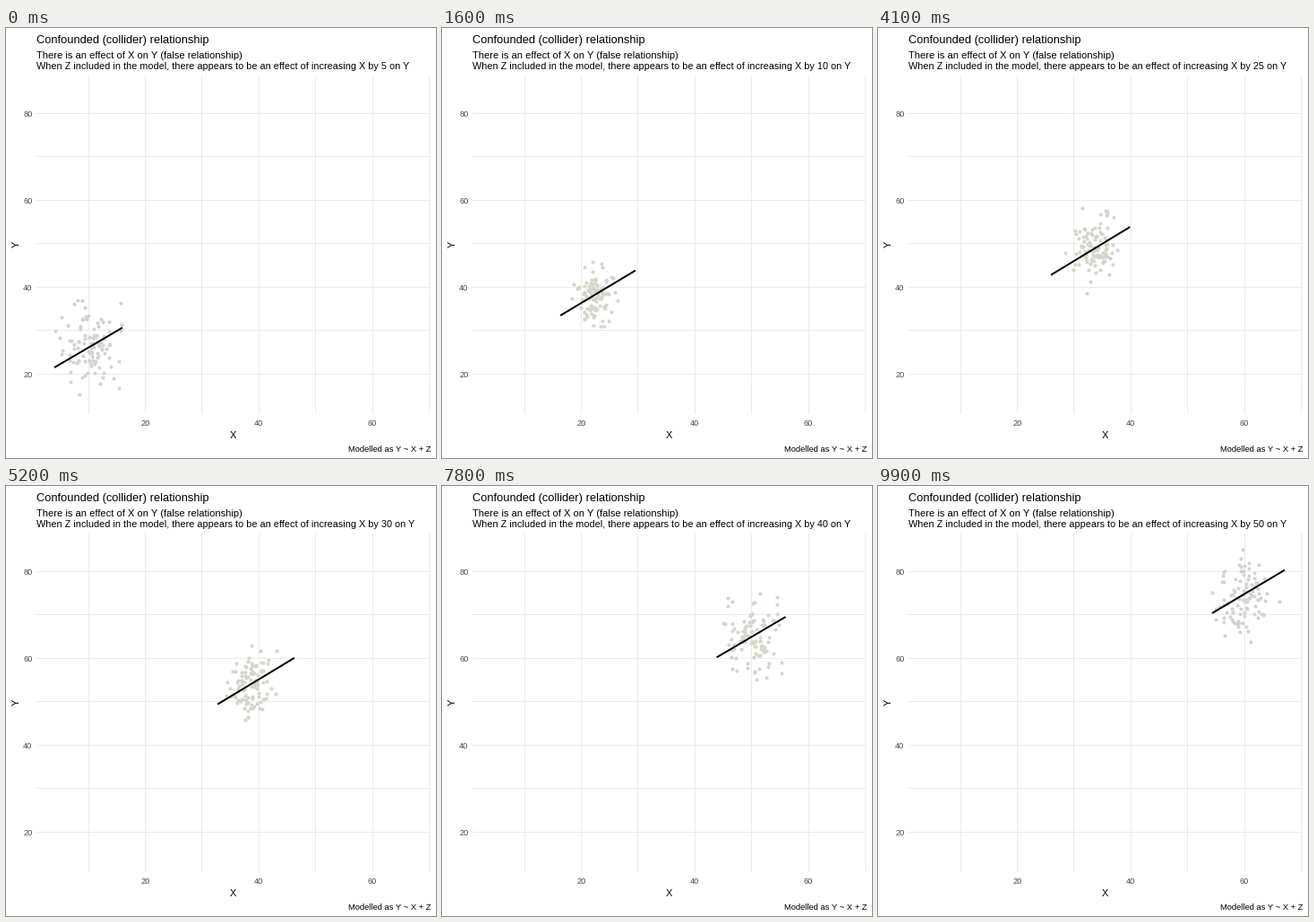
A matplotlib script for the animation above (10 s loop, 480x480 px).

```python
import numpy as np
import matplotlib.pyplot as plt
from matplotlib.animation import FuncAnimation

SIZE, DPI = 480, 96
PT = 72 / DPI            # points per pixel
STEPS = 11               # animation steps between two states
N_STATES, N_DOTS = 10, 100
LAST = STEPS * (N_STATES - 1)
SLOPE = -0.743           # drift of cloud and line, in pixels

plt.rcParams["font.family"] = "Liberation Sans"


def px(x):
    return 92 + 6.34 * (x - 10)


def py(y):
    return 386 - 4.85 * (y - 20)


# Range of X in each state, in pixels; the fitted line spans it.
left = np.array([54, 118, 149, 169, 202, 249, 269, 304, 333, 373])
right = np.array([130, 200, 235, 258, 290, 334, 351, 380, 420, 454])


def make_states():
    """X rises by 5 per state, by 10 in the first one; Y follows it."""
    rng = np.random.default_rng(12)
    noise = rng.uniform(-1, 1, (N_STATES, N_DOTS, 2, 3)).sum(axis=3)
    k = np.arange(N_STATES)
    cx = 93 + 31.4 * np.where(k > 0, k + 1, 0)
    cy = 357 + SLOPE * (cx - 92)
    xs = cx[:, None] + 15 * noise[..., 0]
    ys = cy[:, None] + 21 * noise[..., 1]
    xs = np.clip(xs, left[:, None], right[:, None])
    return np.stack([xs, ys], axis=2)


def blend(values, step):
    k, part = divmod(step, STEPS)
    f = part / STEPS
    return (1 - f) * values[k] + f * values[min(k + 1, N_STATES - 1)]


states = make_states()

fig = plt.figure(figsize=(SIZE / DPI, SIZE / DPI), dpi=DPI, facecolor="white")
ax = fig.add_axes([0, 0, 1, 1])
ax.set_xlim(0, SIZE)
ax.set_ylim(SIZE, 0)
ax.axis("off")


def label(x, y, s, size, color="black", **kw):
    kw.setdefault("va", "baseline")
    return ax.text(x, y, s, fontsize=size * PT, color=color, **kw)


grid = dict(color="#ebebeb", lw=PT, snap=False, solid_capstyle="butt", zorder=1)
for v in range(10, 71, 10):
    ax.plot([np.floor(px(v)) + 0.5] * 2, [53, 431], **grid)
for v in range(20, 81, 10):
    ax.plot([34, 474], [np.floor(py(v)) + 0.5] * 2, **grid)

for v in (20, 40, 60):
    label(px(v), 444, v, 9.3, "#4d4d4d", ha="center")
for v in (20, 40, 60, 80):
    label(29.5, py(v) + 4.3, v, 9.3, "#4d4d4d", ha="right")

label(34, 17, "Confounded (collider) relationship", 12.9)
label(34, 34, "There is an effect of X on Y (false relationship)", 11.1)
effect = label(34, 46, "", 10.85)
label(253.5, 458, "X", 11, ha="center")
label(11.5, 241, "Y", 11, ha="center", va="center", rotation=90)
label(474.5, 473, "Modelled as Y ~ X + Z", 9.4, ha="right")

dots = ax.scatter([], [], s=(4.1 * PT) ** 2, linewidths=0, zorder=2)
fit, = ax.plot([], [], color="black", lw=2 * PT, solid_capstyle="butt", zorder=3)


def update(step):
    dots.set_offsets(blend(states, step))
    dots.set_facecolor("#d3d3d3" if step in (0, LAST) else "#d6d5c9")
    x0, x1 = blend(left, step), blend(right, step)
    fit.set_data([x0, x1], [379 + SLOPE * (x0 - 54), 334.5 + SLOPE * (x1 - 130)])
    amount = 5 * (round(step / STEPS) + 1)
    effect.set_text("When Z included in the model, there appears to be "
                    f"an effect of increasing X by {amount} on Y")
    return dots, fit, effect


anim = FuncAnimation(fig, update, frames=LAST + 1, interval=100,
                     repeat=True, repeat_delay=0, blit=False)
plt.show()
```
